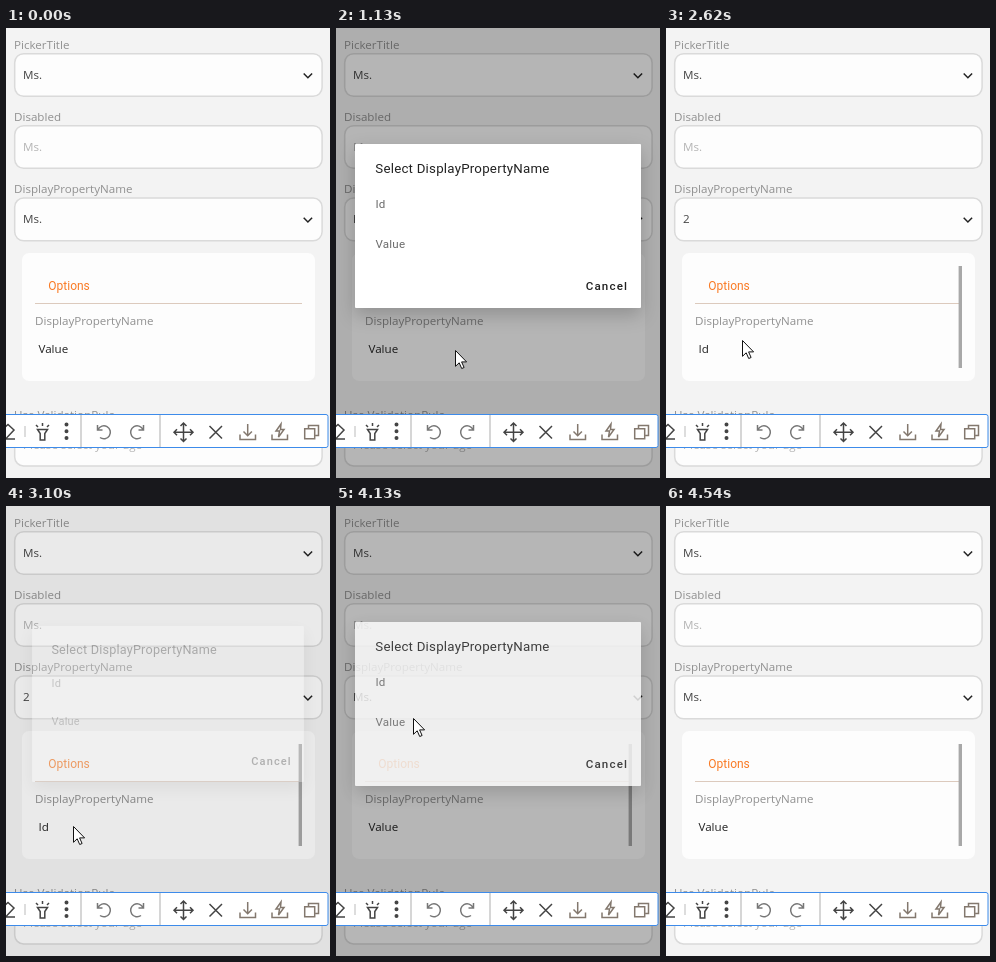
Recreate the animation shown at these times as an HTML page. Size 324x450 px, loop 5.2 s.

```html
<!DOCTYPE html>
<html lang="en">
<head>
<meta charset="utf-8">
<title>Picker demo</title>
<style>
  html, body { margin: 0; width: 100%; height: 100%; overflow: hidden; background: #f3f3f3; }
  svg { display: block; width: 100%; height: 100%; }
  text { font: 11.6px "Open Sans", sans-serif; fill: #444; }
  .label { fill: #909090; }
  .faint { fill: #b4b4b4; }
  .dark { fill: #222; }
  .field { fill: #fdfdfd; stroke: #dadada; stroke-width: 1.5; }
  .chevron { fill: none; stroke: #222; stroke-width: 1.5; }
  .tab { font: 12px Roboto, sans-serif; fill: #f97a24; }
  #dialog text { font: 11.6px Roboto, sans-serif; letter-spacing: .2px; fill: #6c6c6c; }
  #dialog .title { font-size: 13.3px; letter-spacing: .22px; fill: #222; }
  #dialog .button { font-weight: 500; letter-spacing: 1.15px; fill: #222; }
  #panel { filter: drop-shadow(0 7px 9px rgba(0, 0, 0, .2)); }
  .icons { fill: none; stroke: #444; stroke-width: 1.5; }
  .icons .soft { stroke: #777; }
  .icons .warm { stroke: #83786e; }
</style>
</head>
<body>
<svg viewBox="0 0 324 450">
  <rect width="324" height="450" fill="#f3f3f3"/>

  <text class="label" x="8" y="20.5">PickerTitle</text>
  <rect class="field" x="8.7" y="25.7" width="307.4" height="42.6" rx="9"/>
  <text x="17" y="51">Ms.</text>
  <path class="chevron" d="M297.700 45.500l4.200 4.200 4.200-4.200"/>

  <text class="label" x="8" y="93">Disabled</text>
  <rect class="field" x="8.7" y="97.7" width="307.4" height="42.6" rx="9"/>
  <text class="faint" x="17" y="123">Ms.</text>

  <text class="label" x="8" y="165">DisplayPropertyName</text>
  <rect class="field" x="8.7" y="170" width="307.4" height="42.8" rx="9"/>
  <text id="picked" x="17" y="195">Ms.</text>
  <path class="chevron" d="M297.700 189.800l4.200 4.200 4.200-4.200"/>

  <rect x="16" y="225" width="293" height="128" rx="7" fill="#fdfdfd"/>
  <text class="tab" x="42.3" y="261.5">Options</text>
  <path d="M29 275.5h267" stroke="#dccabd"/>
  <text class="label" x="29" y="297">DisplayPropertyName</text>
  <text class="dark" id="property" x="32.5" y="325">Value</text>
  <rect id="scrollbar" x="292.6" y="238" width="3.4" height="102" fill="#a8a8a8"/>

  <text class="label" x="8" y="391">Use ValidationRule</text>
  <rect class="field" x="8.7" y="396" width="307.4" height="42" rx="9"/>
  <text class="faint" x="17" y="420.5">Please select your age</text>

  <rect id="dim" width="324" height="450"/>
  <g id="dialog">
    <rect id="panel" x="19" y="116" width="286" height="164" rx="1" fill="#fff"/>
    <text class="title" x="39.3" y="145">Select DisplayPropertyName</text>
    <text x="39.5" y="180">Id</text>
    <text x="39.5" y="220.3">Value</text>
    <text class="button" x="249.7" y="262.3">Cancel</text>
  </g>

  <rect x="-6" y="386.5" width="328" height="33" rx="2" fill="#fff" stroke="#3d8bea"/>
  <path d="M75 387v32M154 387v32" stroke="#ccc" stroke-width="1.6"/>
  <path d="M19 398v11" stroke="#bbb"/>
  <g class="icons">
    <path d="M-2 400l4-3.5 6 5.5-8 8.5M-1 411h10"/>
    <path d="M31.5 401.5h10l-2.7 4v6.5h-4.6v-6.5zM36.5 395v3M30 397l2 2M43 397l-2 2"/>
    <path d="M60.500 396.500v14" stroke-width="4" stroke-linecap="round" stroke-dasharray="0 6.700"/>
    <path class="soft" d="M91.5 397v5h5M92 401.5a6.5 6.5 0 1 1 2 8"/>
    <path class="soft" d="M137.5 397v5h-5M137 401.5a6.5 6.5 0 1 0-2 8"/>
    <path d="M177.5 395v18.5M168 404.2h19M174.5 398l3-3 3 3M174.5 410.500l3 3 3-3M171 401.200l-3 3 3 3M184 401.200l3 3-3 3"/>
    <path d="M203.500 398l12.500 12.500M216 398l-12.500 12.500"/>
    <path class="warm" d="M234 406.500v5h15.500v-5M241.700 396v11.500M237.500 403.500l4.200 4.200 4.200-4.200"/>
    <path class="warm" d="M266 406.500v5h15.500v-5M275 396l-5 7h3.500l-1 6 5.500-7.500h-3.500z"/>
    <path class="warm" d="M302.500 400.500v-3h10v10h-3M298.700 400.800h10v10h-10z"/>
  </g>

  <path id="cursor" d="M.5.5v15.800l3.700-3.500 2.500 5.700 2.400-1-2.500-5.600h5z" fill="#fff" stroke="#111"/>
</svg>
<script>
const LOOP = 5200;
const FADE = 140;
const el = id => document.getElementById(id);
const clamp = v => Math.min(1, Math.max(0, v));
const easeOut = k => 1 - (1 - k) ** 2.5;

// The fade-out is already under way when it first shows, and ends at "gone".
const dialogs = [
  { open: 1040, close: 2060, gone: 2144 },
  { open: 3100, close: 4130, gone: 4250 }
];

// Each move starts where the last one ended; "via" bends it into an arc.
const entry = [95, 394];
const moves = [
  { from: 140, until: 520, to: [131, 332], via: [230, 350] },
  { from: 630, until: 800, to: [119, 322] },
  { from: 1320, until: 1780, to: [81, 178] },
  { from: 2245, until: 2770, to: [69, 319], via: [160, 231] },
  { from: 2770, until: 2860, to: [67, 320] },
  { from: 3325, until: 3800, to: [77, 212] },
  { from: 4400, until: 4490, to: [7, 314] }
];

function cursorAt(t) {
  return moves.reduce((start, { from, until, to, via }) => {
    const k = easeOut(clamp((t - from) / (until - from)));
    return start.map((a, i) => {
      const bend = via ? via[i] : (a + to[i]) / 2;
      return a * (1 - k) ** 2 + 2 * bend * k * (1 - k) + to[i] * k * k;
    });
  }, entry);
}

function dialogAt(t) {
  const current = dialogs.find(d => t >= d.open && t < d.gone);
  if (!current) return { level: 0, opacity: 0, scale: 1 };
  if (t >= current.close) {
    const level = clamp((current.gone - t) / FADE);
    return { level, opacity: level ** 1.4, scale: 1 };
  }
  const level = clamp((t - current.open + 30) / FADE);
  const opacity = clamp(level * 1.3);
  return { level, opacity, scale: .93 + .07 * opacity };
}

function draw(t) {
  const [first, second] = dialogs;
  const idChosen = t >= first.close && t < second.close;
  el("picked").textContent = idChosen ? "2" : "Ms.";
  el("property").textContent = idChosen ? "Id" : "Value";

  const scrollbar = t < first.close ? 0 : idChosen ? clamp((3800 - t) / 180) : 1;
  el("scrollbar").setAttribute("opacity", scrollbar);

  const { level, opacity, scale } = dialogAt(t);
  el("dim").setAttribute("opacity", .33 * level);
  el("dialog").setAttribute("opacity", opacity);
  el("dialog").setAttribute("transform", `translate(162 198) scale(${scale}) translate(-162 -198)`);

  const [x, y] = cursorAt(t).map(Math.round);
  el("cursor").setAttribute("transform", `translate(${x} ${y})`);
  el("cursor").setAttribute("visibility", t >= 140 && t < 4540 ? "visible" : "hidden");
}

const start = performance.now();
function tick() {
  draw((performance.now() - start) % LOOP);
  requestAnimationFrame(tick);
}
draw(0);
requestAnimationFrame(tick);
</script>
</body>
</html>
```
